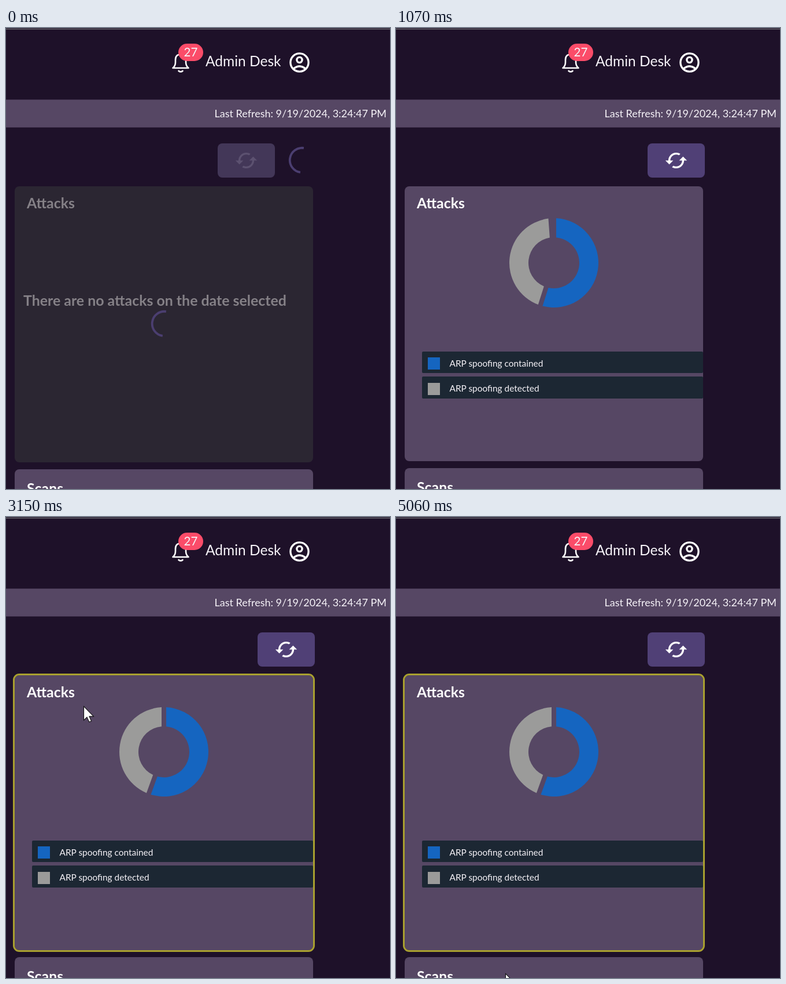
Recreate the animation shown at these times as an HTML page. Size 664 by 795 pixels, loop 5130 ms.

```html
<!DOCTYPE html>
<html lang="en">
<head>
<meta charset="utf-8">
<title>Attack dashboard</title>
<style>
  html, body { margin: 0; width: 100%; height: 100%; overflow: hidden; background: #1e1129; }
  svg { display: block; width: 100vw; height: 100vh; }
  text { font-family: Lato, "Open Sans", sans-serif; fill: #f6f3f8; }
  .title { font-size: 24.9px; font-weight: 700; fill: #fff; }
  .legend { font-size: 15.45px; }
  .dim { fill: #858187; }
  .panel { fill: #564764; }
  .line { fill: none; stroke: #fff; stroke-linecap: round; stroke-linejoin: round; }
  .spinner { fill: none; stroke: #4b3e70; stroke-width: 3.8; }
</style>
</head>
<body>
<svg viewBox="0 0 664 795">
  <defs>
    <path id="refresh" transform="translate(-20.4 -20.4) scale(1.7)" d="M19 8l-4 4h3c0 3.31-2.69 6-6 6-1.01 0-1.97-.25-2.8-.7l-1.46 1.46C8.97 19.54 10.43 20 12 20c4.42 0 8-3.58 8-8h3zM6 12c0-3.31 2.69-6 6-6 1.01 0 1.97.25 2.8.7l1.46-1.46C15.03 4.46 13.57 4 12 4c-4.42 0-8 3.58-8 8H1l4 4 4-4z"/>
    <path id="spin" class="spinner" d="M2.5-21A21 21 0 0 0-3.5 20.8"/>
  </defs>
  <rect width="664" height="795" fill="#1e1129"/>
  <rect y="1" width="664" height="1.5" fill="#68666d"/>

  <!-- Header -->
  <g class="line" stroke-width="2.6">
    <path d="M288.5 69H315.5Q311 65.5 311 59V55Q311 45.5 302 45.5T293 55V59Q293 65.5 288.5 69Z"/>
    <path d="M298.5 74Q302 77 305.5 74"/>
    <g stroke-width="3.3">
      <circle cx="507.5" cy="59.5" r="15.6"/>
      <circle cx="507.5" cy="55" r="4.6"/>
      <path d="M497 70.5Q507.5 61.5 518 70.5"/>
    </g>
  </g>
  <rect x="298" y="27" width="43" height="30" rx="15" fill="#fb4c69"/>
  <text x="319.5" y="49" font-size="20.5" text-anchor="middle">27</text>
  <text x="345" y="66" font-size="24.5">Admin Desk</text>
  <rect class="panel" y="123.5" width="664" height="48"/>
  <text x="658" y="154" font-size="18" text-anchor="end">Last Refresh: 9/19/2024, 3:24:47 PM</text>

  <g id="loading">
    <rect x="366" y="199" width="99" height="59" rx="8" fill="#433758"/>
    <use href="#refresh" x="415.5" y="228.5" fill="#5c5170"/>
    <use href="#spin" x="512.4" y="228"/>
    <rect x="15" y="273" width="516" height="476" rx="8" fill="#2b2632"/>
    <text class="title dim" x="36" y="311">Attacks</text>
    <text class="title dim" x="30" y="479">There are no attacks on the date selected</text>
    <use href="#spin" x="274.3" y="510"/>
  </g>

  <g id="loaded">
    <rect id="button" x="435" y="199" width="99" height="59" rx="8"/>
    <use href="#refresh" x="484.5" y="228.5" fill="#fff"/>
    <rect class="panel" x="15" y="273" width="516" height="474" rx="8"/>
    <text class="title" x="36" y="311">Attacks</text>
    <path id="contained" fill="#1565c0"/>
    <path id="detected" fill="#9b9b9a"/>
    <g fill="#1c2733">
      <rect x="45" y="558" width="486" height="37" rx="2"/>
      <rect x="45" y="601" width="486" height="38" rx="2"/>
    </g>
    <rect x="55" y="568" width="21" height="21" fill="#1565c0"/>
    <rect x="55" y="612" width="21" height="21" fill="#9b9b9a"/>
    <text class="legend" x="92.5" y="584">ARP spoofing contained</text>
    <text class="legend" x="92.5" y="627">ARP spoofing detected</text>
  </g>

  <g id="scans">
    <rect class="panel" x="15" y="759" width="516" height="60" rx="8"/>
    <text class="title" x="36" y="801">Scans</text>
  </g>

  <g id="hover">
    <rect x="13.5" y="271.5" width="519" height="477" rx="9.5" fill="none" stroke="#a9a02f" stroke-width="3"/>
    <path id="cursor" d="M.5.5V24.5L6 19.3 9.8 27.6 13.6 25.9 10 17.9H17.5Z" fill="#fff" stroke="#111" stroke-width="1.1"/>
  </g>
</svg>
<script>
const LOOP = 5130, LOADED = 68, HOVER = 2128;
const el = id => document.getElementById(id);
const show = (id, on) => { el(id).style.display = on ? "" : "none"; };
const clamp = x => Math.min(1, Math.max(0, x));
const smooth = x => x * x * (3 - 2 * x);

// Cursor stops: time, x, y
const stops = [
  [2130, 70, 600], [2330, 150, 525], [2600, 177, 468], [2670, 174, 451], [3150, 134, 326],
  [3290, 134, 326], [3860, 311, 586], [3990, 311, 587], [4190, 293, 600], [4390, 276, 621],
  [4730, 276, 622], [5060, 189, 787]
];
const eased = new Set([3290]);

function cursorAt(t) {
  let i = 0;
  while (i < stops.length - 2 && t >= stops[i + 1][0]) i++;
  const [t0, x0, y0] = stops[i], [t1, x1, y1] = stops[i + 1];
  let k = clamp((t - t0) / (t1 - t0));
  if (eased.has(t0)) k = smooth(k);
  return [x0 + (x1 - x0) * k, y0 + (y1 - y0) * k];
}

// Ring sector whose straight sides keep a constant gap to the neighbours
function sector(from, to) {
  const outer = 77, inner = 44, gap = 4;
  const point = (r, a) => `${273 + r * Math.sin(a)} ${405 - r * Math.cos(a)}`;
  const ends = r => {
    const pad = Math.min(Math.asin(gap / r), (to - from) / 2);
    return [from + pad, to - pad];
  };
  const [a, b] = ends(outer), [c, d] = ends(inner);
  const large = x => +(x > Math.PI);
  return `M${point(outer, a)}A${outer} ${outer} 0 ${large(b - a)} 1 ${point(outer, b)}` +
    `L${point(inner, d)}A${inner} ${inner} 0 ${large(d - c)} 0 ${point(inner, c)}Z`;
}

function draw(now) {
  const t = now % LOOP;
  const loaded = t >= LOADED, hover = t >= HOVER;
  show("loading", !loaded);
  show("loaded", loaded);
  show("hover", hover);
  el("scans").setAttribute("transform", `translate(0 ${loaded ? 0 : 2})`);

  if (loaded) {
    const x = clamp((t - 53) / 1580);
    const sweep = (x < 1 ? 1 - 2 ** (-10 * x) : 1) * 2 * Math.PI;
    const split = sweep * 5 / 9;
    el("contained").setAttribute("d", sector(0, split));
    el("detected").setAttribute("d", sector(split, sweep));
    const fade = smooth(clamp((t - 70) / 250));
    const mix = (a, b) => Math.round(a + (b - a) * fade);
    el("button").setAttribute("fill", `rgb(${mix(128, 80)},${mix(120, 64)},${mix(157, 118)})`);
  }
  if (hover) el("cursor").setAttribute("transform", `translate(${cursorAt(t)})`);
}

const start = performance.now();
function tick() {
  draw(performance.now() - start);
  requestAnimationFrame(tick);
}
tick();
</script>
</body>
</html>
```
